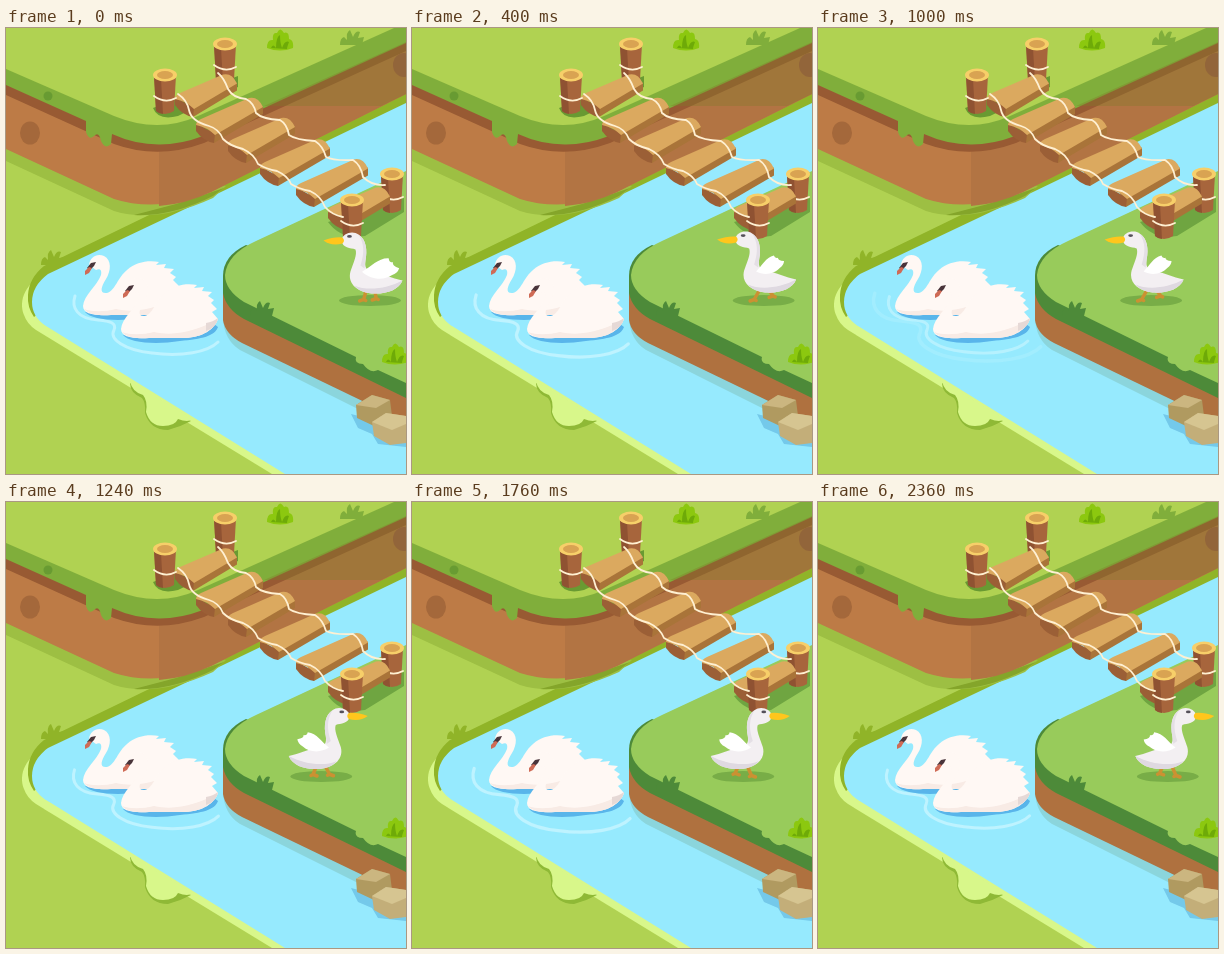
Recreate the animation shown at these times as an HTML page. Size 400x446 px, loop 2400 ms.

```html
<!DOCTYPE html>
<html lang="en">
<head>
<meta charset="utf-8">
<title>Pond</title>
<style>
  html, body { margin: 0; width: 100%; height: 100%; overflow: hidden; background: #b0d252; }
  svg { display: block; width: 400px; height: 446px; }
  .rope { fill: none; stroke: #fff0d2; stroke-width: 1.8; stroke-linecap: round; stroke-linejoin: round; }
  .ripple { fill: none; stroke: #c9f6ff; stroke-width: 3; stroke-linecap: round; }
</style>
</head>
<body>
<svg viewBox="0 0 400 446">
  <defs>
    <g id="post">
      <path d="M-11 0L-9 36Q0 42 9 36L11 0Z" fill="#a7653c"/>
      <path d="M-11 0L-9 36Q-6 39 -2 39L-4 4Z" fill="#8f5232"/>
      <ellipse rx="12" ry="6.5" fill="#f7cf69"/>
      <ellipse rx="8" ry="4" fill="#d9a352"/>
      <path class="rope" d="M-11 21Q0 29 11 23"/>
    </g>
    <g id="swan">
      <path d="M79 284C85 292 112 294 136 290C158 288 171 285 174 276L166 270L90 280Z" fill="#59b5ea"/>
      <path d="M83 237C84 229 91 225 98 228C106 232 105 243 100 251C95 259 93 266 101 265C109 263 112 249 121 242C130 234 142 232 153 234L150 237L160 236L158 240L168 241L164 245L170 249L167 252L173 258L168 261L174 268C170 278 160 286 141 287H105C88 288 77 286 77 278C78 267 91 258 95 247C96 242 94 240 90 242Z" fill="#fff8f4"/>
      <path d="M110 281C132 286 154 279 174 268C170 278 160 286 141 287H105C92 288 82 286 78 281C86 284 98 284 110 281Z" fill="#f8ebe5"/>
      <path d="M162 272Q169 271 174 267Q173 276 162 280Z" fill="#e6d9d6"/>
      <path d="M90 234L85 235L81 240L84 242L88 238Z" fill="#49343a"/>
      <path d="M83 239L79 243L79 247L83 245L86 240Z" fill="#cf6b56"/>
    </g>
    <g id="bush">
      <path d="M-13 8Q-13 -1 -7 0Q-8 -8 -3 -7Q0 -14 4 -7Q9 -9 9 -1Q14 0 13 8Q0 13 -13 8Z" fill="#8cc80f"/>
      <path d="M-9 8Q-7 3 -4 8Q-4 -3 0 -5Q0 3 2 8Q5 0 9 2Q7 7 7 9Z" fill="#6eaa08"/>
    </g>
    <path id="tuft" d="M-12 9Q-12 2 -8 1L-5 4Q-6 -4 -2 -6L1 1Q4 -6 8 -4L6 2L12 1L10 9Z"/>
    <path id="wave" d="M69 268C65 280 72 291 92 292C104 293 111 295 108 302C103 311 118 322 146 325C176 329 202 324 212 314"/>
  </defs>

  <!-- water and near bank -->
  <rect width="400" height="446" fill="#b0d252"/>
  <path d="M40 246C20 254 12 272 18 287Q21 296 30 302L266 446H300L200 300Z" fill="#d8f78a"/>
  <path d="M124 355Q124 365 136 370Q140 375 139 385Q144 402 162 402Q174 399 185 393Z" fill="#8fb936"/>
  <path d="M124 353Q126 364 137 367Q142 373 140 384Q144 398 157 398Q169 398 172 391Q182 395 187 391Z" fill="#d8f78a"/>
  <path d="M400 62L205 157L38 238Q23 250 22 267Q21 279 28 289L60 262L400 80Z" fill="#90b428"/>
  <path d="M400 75L215 164L42 246Q26 258 26 274Q26 289 40 298L279 446H400Z" fill="#96eafe"/>
  <use href="#tuft" x="47" y="228" fill="#90b428"/>

  <!-- far terrace -->
  <path d="M0 118V133L108 183Q150 196 207 170L220 158Z" fill="#9dbf43"/>
  <path d="M128 187Q165 189 207 168L218 160L170 176Z" fill="#84a52a"/>
  <path d="M0 50V121L108 171Q152 185 205 164L400 66V0Z" fill="#bd7b46"/>
  <path d="M153 100V178Q180 176 205 164L400 66V0Z" fill="#b27443"/>
  <path d="M0 50V67L108 116Q152 132 198 115L400 23V0Z" fill="#985a33"/>
  <path d="M0 35V57L80 93V104Q83 113 88 108Q93 103 95 113Q99 122 105 116L106 106Q150 126 197 108L400 15V-10Z" fill="#80ae3b"/>
  <path d="M0 0V41L108 88Q152 106 192 88L388 0Z" fill="#b0d252"/>
  <path d="M258 78L400 14V66L375 78Z" fill="#7f7a28" opacity=".35"/>
  <use href="#tuft" x="346" y="8" fill="#80ae3b"/>
  <circle cx="42" cy="68" r="4.5" fill="#689b32"/>
  <ellipse cx="24" cy="105" rx="10" ry="11.5" fill="#a4683b"/>
  <ellipse cx="398" cy="37" rx="11" ry="12" fill="#92653a"/>
  <use href="#bush" x="274" y="12"/>

  <!-- island -->
  <path d="M217 290Q218 312 234 322L350 380L400 404V370Z" fill="#8bd5dc"/>
  <path d="M217 250V292Q219 306 236 315L400 394V300Z" fill="#af713f"/>
  <path d="M240 217Q217 228 217 248V265Q220 281 238 291L400 370V280Z" fill="#4d8a39"/>
  <path d="M400 143L250 213Q221 226 219 247Q219 262 238 274L350 329Q348 336 357 336Q364 346 372 342L400 355Z" fill="#98cb5b"/>
  <use href="#tuft" x="256" y="279" fill="#4d8a39"/>
  <use href="#bush" x="389" y="326"/>
  <path d="M345 386L352 400L366 406L372 416L400 419V400Z" fill="#74c9ea"/>
  <path d="M350 377L366 367L384 372L386 388L368 398L351 390Z" fill="#b09a60"/>
  <path d="M350 377L366 367L384 372L370 380Z" fill="#cbb680"/>
  <path d="M366 394L380 385L400 388V415L384 417L368 408Z" fill="#c3ae79"/>
  <path d="M366 394L380 385L400 388V396L386 402Z" fill="#d6c591"/>

  <!-- bridge -->
  <path d="M147 80Q152 93 172 88L232 59V48Z" fill="#699a32"/>
  <path d="M322 194Q335 212 359 208L398 184V170Z" fill="#6fa541"/>
  <use href="#post" x="219" y="16"/>
  <use href="#post" x="386" y="146"/>
  <g id="planks"></g>
  <use href="#post" x="159" y="47"/>
  <use href="#post" x="346" y="172"/>
  <path class="rope" d="M212 45Q218 50 222 61Q227 70 240 71Q248 75 250 85Q256 91 274 92Q281 96 283 107Q290 112 309 113Q317 118 320 129Q328 133 347 132Q355 137 357 149Q366 158 379 157"/>
  <path class="rope" d="M172 66Q181 72 183 82Q185 93 203 98Q213 101 217 111Q224 118 237 121Q248 126 252 136Q260 141 271 143Q282 148 285 156Q293 161 304 163Q315 168 319 179Q326 187 337 189"/>

  <!-- birds -->
  <g id="ripples"></g>
  <use href="#swan"/>
  <use href="#swan" x="38" y="23"/>
  <g id="goose">
    <ellipse cx="6.5" cy="272.5" rx="31" ry="5.5" fill="#78ad47"/>
    <g fill="none" stroke="#cb9132" stroke-width="3.5" stroke-linecap="round" stroke-linejoin="round">
      <path id="backLeg"/><path id="frontLeg"/>
    </g>
    <g id="body">
      <path d="M-22 212C-21 204 -10 202 -5 206C3 211 4 222 2 232C1 239 3 242 8 243C20 245 28 250 39 252C35 262 22 266 8 265C-8 263 -16 254 -13 243C-10 234 -6 226 -8 221C-13 219 -21 220 -22 212Z" fill="#f3eff2"/>
      <path d="M-9 257C4 263 24 260 39 252C35 262 22 266 8 265C0 264 -5 262 -9 257Z" fill="#dfd9e1"/>
      <path d="M-5 206C3 211 4 222 2 232L1 240L-3 237C1 225 1 215 -5 206Z" fill="#e4dfe5"/>
      <path d="M-21 209Q-29 208 -40 212Q-32 218 -21 215Q-18 212 -21 209Z" fill="#ffc61c"/>
      <ellipse cx="-14" cy="208" rx="2.4" ry="1.4" fill="#55505a"/>
      <path id="wing" d="M0 245C6 239 9 231 17 229Q18 232 21 231Q21 234 27 234Q27 238 23 241C18 247 8 249 0 245Z" fill="#fff"/>
    </g>
  </g>
</svg>
<script>
const LOOP = 2400, HALF = 1200, STEP = 300, LEAD = 600;
const byId = id => document.getElementById(id);
const set = (el, attrs) => { for (const k in attrs) el.setAttribute(k, attrs[k]); };
const add = (parent, tag, attrs) => {
  const el = document.createElementNS('http://www.w3.org/2000/svg', tag);
  set(el, attrs);
  return parent.appendChild(el);
};

// Each plank: left corner x, y and its length along the slope.
const planks = [[169, 71, 48], [190, 97, 53], [222, 117, 53], [254, 140, 56], [290, 161, 58], [322, 184, 48]];
for (const [x, y, w] of planks) {
  const h = w * .51;
  const top = `M${x} ${y}Q${x} ${y - 4} ${x + 5} ${y - 6}L${x + w} ${y - h}Q${x + w + 9} ${y - h - 2} ${x + w + 14} ${y - h + 9}L${x + 19} ${y + 10}Q${x + 11} ${y + 2} ${x} ${y}Z`;
  const side = `M${x + 10} ${y}L${x + 18} ${y + 18}L${x + w + 14} ${y - h + 16}V${y - h + 8}Z`;
  const cap = `M${x} ${y - 2}V${y + 6}Q${x + 7} ${y + 16} ${x + 18} ${y + 18}L${x + 19} ${y + 9}Z`;
  add(byId('planks'), 'path', { d: side, fill: '#a97439' });
  add(byId('planks'), 'path', { d: cap, fill: '#9b5f36' });
  add(byId('planks'), 'path', { d: top, fill: '#dba95f' });
}

const ripples = [0, 1].map(() => add(byId('ripples'), 'use', { href: '#wave', class: 'ripple' }));

function drawRipples(t) {
  ripples.forEach((ripple, i) => {
    const age = (t + LEAD) % HALF + i * HALF;
    const fadeIn = Math.min(1, age / 500), fadeOut = Math.min(1, (1750 - age) / 500);
    const scale = 1 + .16 * (age - LEAD) / 1000;
    set(ripple, {
      opacity: Math.max(0, Math.min(fadeIn, fadeOut)) * .8,
      transform: `translate(145 285) scale(${scale}) translate(-145 -285)`
    });
  });
}

function drawGoose(t) {
  const left = t < HALF;
  const x = 357.5 - 37 * (left ? t : LOOP - t) / HALF;
  const wave = Math.sin(Math.PI * t / STEP);
  const stride = Math.abs(wave) ** .6;
  const reach = 6 + 3.8 * stride;
  const leg = (hip, foot, lift) =>
    `M${hip} 261L${foot} ${271.5 - lift}l-4 1.5M${foot} ${271.5 - lift}l2 1`;
  set(byId('goose'), { transform: `translate(${x} ${left ? 0 : 2}) scale(${left ? 1 : -1} 1)` });
  set(byId('frontLeg'), { d: leg(3, 6.5 - reach, 3 * Math.max(0, wave)) });
  set(byId('backLeg'), { d: leg(11, 6.5 + reach, 3 * Math.max(0, -wave) + 1) });
  set(byId('body'), { transform: `translate(0 ${.5 - stride})` });
  set(byId('wing'), {
    transform: `translate(1 244) rotate(${18 * (1 - stride)}) scale(${1.3 - .3 * stride}) translate(-2 -245)`
  });
}

function frame(now) {
  const t = now % LOOP;
  drawRipples(t);
  drawGoose(t);
  requestAnimationFrame(frame);
}
frame(0);
</script>
</body>
</html>
```
